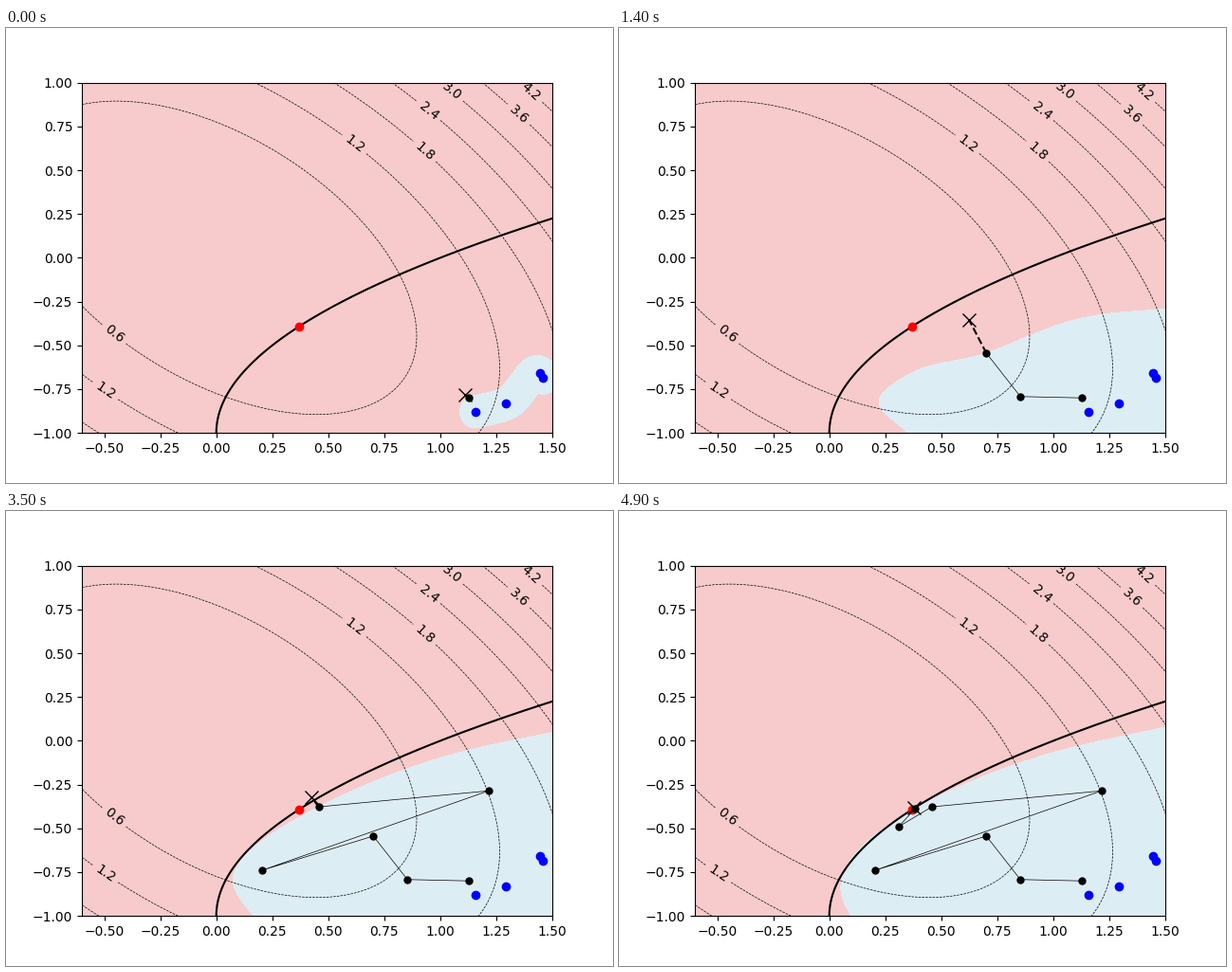
Recreate the animation shown at these times as a matplotlib script. Size 640 by 480 pixels, loop 5600 ms.

```python
import numpy as np
import matplotlib.pyplot as plt
from matplotlib.animation import FuncAnimation

PINK, BLUE = "#f7cbcb", "#ddedf4"
XLIM, YLIM = (-0.6, 1.5), (-1.0, 1.0)

initial = [(1.159, -0.880), (1.294, -0.833), (1.447, -0.660), (1.459, -0.687)]
optimum = (0.370, -0.393)

# Each sample lies on the edge of the region known to be safe at that step.
samples = [(1.128, -0.800), (0.853, -0.792), (0.701, -0.544), (0.205, -0.739),
           (1.215, -0.286), (0.458, -0.377), (0.310, -0.490), (0.382, -0.389)]
proposals = [(1.112, -0.785), (0.820, -0.785), (0.625, -0.357),
             (0.069, -0.712), (1.178, 0.068), (0.425, -0.325),
             (0.285, -0.447), (0.376, -0.383)]


def objective(x, y):
    return x**2 + x * y + y**2


def limit(y):
    """The constraint is x >= limit(y)."""
    return (y + 1) ** 2


def smooth(points, n=20):
    """Hermite curve through the points, parametrised by chord length."""
    p = np.asarray(points, dtype=float)
    h = np.hypot(*np.diff(p, axis=0).T)
    m = np.gradient(p, np.r_[0, np.cumsum(h)], axis=0)
    s = np.linspace(0, 1, n)[:, None]
    parts = [
        (2 * s**3 - 3 * s**2 + 1) * p[i] + (s**3 - 2 * s**2 + s) * d * m[i]
        + (3 * s**2 - 2 * s**3) * p[i + 1] + (s**3 - s**2) * d * m[i + 1]
        for i, d in enumerate(h)
    ]
    return np.concatenate(parts)


def safe_region(sample, top, foot, *bends):
    """Region below an edge from the right border (top) to the floor (foot).

    The edge is smoothed as margin to the constraint against height.
    """
    keys = [(XLIM[1], top), sample, *bends, (foot, YLIM[0])]
    x, y = np.array(sorted(keys, key=lambda k: -k[1])).T
    margin, y = smooth(np.column_stack([x - limit(y), y])).T
    return np.vstack([np.column_stack([margin + limit(y), y]),
                      (XLIM[1], YLIM[0])])


# Border height, floor position and bends of the edge for each later step
edges = [
    (-0.307, 0.845, (1.115, -0.490), (0.916, -0.663), (0.840, -0.907)),
    (-0.290, 0.353, (1.094, -0.355), (0.374, -0.653), (0.230, -0.788)),
    (-0.182, 0.330, (0.839, -0.420), (0.374, -0.593), (0.217, -0.810)),
    (-0.263, 0.217, (0.691, -0.366), (0.365, -0.496), (0.077, -0.734)),
    (0.048, 0.166, (1.051, -0.079), (0.077, -0.766)),
    (0.056, 0.141, (0.797, -0.182), (0.073, -0.788)),
    (0.078, 0.099, (0.967, -0.079), (0.052, -0.853)),
]
regions = [np.full((3, 2), XLIM[1])]
regions += [safe_region(s, *e) for s, e in zip(samples[1:], edges)]

fig, ax = plt.subplots(figsize=(6.4, 4.8), dpi=100)
ax.set_facecolor(PINK)

# Safe area: a band around the initial samples, later a growing region
ax.plot(*smooth(initial).T, color=BLUE, lw=24.5, solid_capstyle="round",
        solid_joinstyle="round", antialiased=False, zorder=0.5)
region, = ax.fill(*regions[0].T, color=BLUE, lw=0,
                  antialiased=False, zorder=0.5)

gx, gy = np.meshgrid(np.linspace(*XLIM, 200), np.linspace(*YLIM, 200))
contours = ax.contour(gx, gy, objective(gx, gy), levels=np.arange(1, 8) * 0.6,
                      colors="k", linewidths=0.5, linestyles="dashed",
                      zorder=1)
ax.set(xlim=XLIM, ylim=YLIM)
ax.clabel(contours, fontsize=10, fmt="%.1f")

y = np.linspace(*YLIM, 300)
ax.plot(limit(y), y, "k", lw=1.5, zorder=2)
ax.plot(*zip(*initial), "bo", ms=6, zorder=3)
ax.plot(*zip(optimum), "ro", ms=6, zorder=3)

path, = ax.plot([], [], "ko-", lw=0.5, ms=5, zorder=4)
link, = ax.plot([], [], "k--", lw=1.5, zorder=4)
cross, = ax.plot([], [], "kx", ms=10, mew=1, zorder=5)
ax.set(xlim=XLIM, ylim=YLIM)


def draw(i):
    region.set_xy(regions[i])
    path.set_data(*zip(*samples[:i + 1]))
    link.set_data(*zip(samples[i], proposals[i]))
    cross.set_data(*zip(proposals[i]))
    return region, path, link, cross


anim = FuncAnimation(fig, draw, frames=len(samples), interval=700,
                     repeat=True, repeat_delay=0)
plt.show()
```
